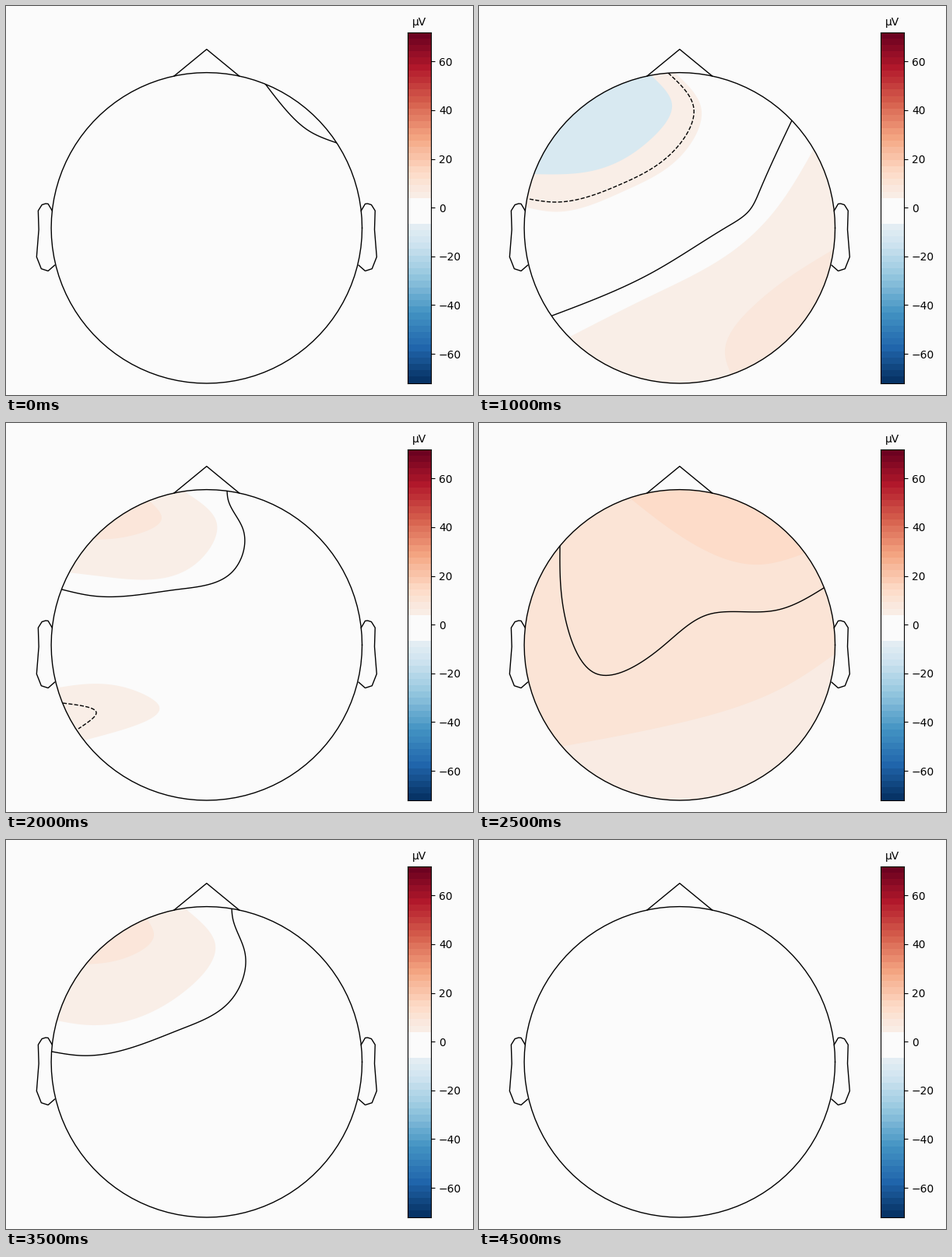
Animation of 600 by 500 pixels, one loop 5 s. Source, as a matplotlib script:

```python
import numpy as np
import matplotlib.pyplot as plt
from matplotlib.animation import ArtistAnimation
from matplotlib.patches import Circle, Polygon

W, H = 600, 500
CX, CY, R = 257.8, 285.3, 199.7
VMAX = 72
PAPER = "#fbfbfb"
CORNERS = {"tl": (0, 0), "tr": (520, 0), "br": (520, 500), "bl": (0, 500)}

fig = plt.figure(figsize=(W / 100, H / 100), dpi=100, facecolor=PAPER)
ax = fig.add_axes([0, 0, 1, 1])
ax.set(xlim=(0, W), ylim=(H, 0))
ax.axis("off")


def tint(volts):
    if -6.3 < volts < 4:
        return PAPER
    return plt.get_cmap("RdBu_r")(0.5 + volts / (2 * VMAX))


def curve(*pts, n=120):
    """Natural cubic spline through key points, sampled by chord length."""
    p = np.array(pts, float)
    h = np.hypot(*np.diff(p, axis=0).T)
    s = np.append(0, np.cumsum(h))
    d = np.diff(p, axis=0) / h[:, None]
    a = np.zeros((len(p), len(p)))
    b = np.zeros_like(p)
    a[0, :2], a[-1, -2:] = (2, 1), (1, 2)
    b[0], b[-1] = 3 * d[0], 3 * d[-1]
    for i in range(1, len(p) - 1):
        a[i, i - 1:i + 2] = h[i], 2 * (h[i - 1] + h[i]), h[i - 1]
        b[i] = 3 * (h[i] * d[i - 1] + h[i - 1] * d[i])
    m = np.linalg.solve(a, b)
    u = np.linspace(0, s[-1], n)
    k = np.clip(np.searchsorted(s, u) - 1, 0, len(h) - 1)
    t, w = ((u - s[k]) / h[k])[:, None], h[k][:, None]
    return (p[k] * (1 + 2 * t) * (1 - t)**2 + p[k + 1] * t**2 * (3 - 2 * t)
            + w * t * (1 - t) * (m[k] * (1 - t) - m[k + 1] * t))


def blend(a, b, t):
    return a + (b - a) * t


def clip(artist):
    artist.set_clip_path(Circle((CX, CY), R, transform=ax.transData))
    return artist


def disc(volts=0):
    return ax.add_patch(Circle((CX, CY), R, fc=tint(volts), lw=0, zorder=1))


def area(volts, edge, *corners):
    """Fill one side of a curve, closed through points outside the head."""
    ends = []
    for end in edge[[0, -1]]:
        v = end - (CX, CY)
        ends.append((CX, CY) + v * max(1, 1.06 * R / np.hypot(*v)))
    shape = np.vstack([ends[0], edge, ends[1]] + [CORNERS[c] for c in corners])
    return clip(ax.add_patch(Polygon(shape, fc=tint(volts), lw=0, zorder=2)))


def line(path, style="-"):
    return clip(ax.plot(*path.T, "k", ls=style, lw=1, zorder=3)[0])


def head():
    a = np.linspace(0, 2 * np.pi, 101)
    nose = np.exp(1j * np.arccos(np.radians(12)))
    ear_x = 2 * np.array([.497, .510, .518, .5299, .5419, .54, .547, .532, .510, .489])
    ear_y = 2 * np.array([.0555, .0775, .0783, .0746, .0555,
                          -.0055, -.0932, -.1313, -.1384, -.1199])
    parts = [(np.cos(a), np.sin(a)),
             ([-nose.real, 0, nose.real], [nose.imag, 1.15, nose.imag]),
             (ear_x, ear_y), (-ear_x, ear_y)]
    for x, y in parts:
        ax.plot(CX + R * np.array(x), CY - R * np.array(y), "k", lw=1, zorder=4)


def scale_bar(left=516.2, bottom=484.7, width=30, height=451, bands=55):
    bar = fig.add_axes([left / W, 1 - bottom / H, width / W, height / H])
    edges = np.linspace(-VMAX, VMAX, bands + 1)
    for lo, hi in zip(edges, edges[1:]):
        bar.axhspan(lo, hi, fc=tint((lo + hi) / 2), lw=0)
    bar.set(xlim=(0, 1), ylim=(-VMAX, VMAX), xticks=[], yticks=range(-60, 61, 20))
    bar.yaxis.tick_right()
    bar.set_title("µV", fontsize=10)


def start():
    return [disc(), line(curve((333, 100), (360, 134), (390, 161), (425, 176)))]


def warm_left():
    hot = curve((62, 238), (90, 245), (134, 218), (162, 145), (158, 112))
    warm = curve((94, 398), (175, 375), (221, 308), (225, 200), (209, 125), (184, 100))
    zero = curve((205, 93), (247, 128), (297, 210), (340, 283), (442, 360))
    cool = curve((228, 88), (283, 127), (338, 207), (405, 264), (457, 267))
    cold = curve((278, 88), (332, 140), (375, 192), (442, 209))
    pale = curve((196, 94), (254, 190), (282, 335), (267, 380), (326, 437), (250, 484))
    white = curve((200, 94), (262, 160), (312, 265), (369, 352), (430, 381))
    parts = [disc(9.5), area(5, pale, "br", "tr"), area(0, white, "br", "tr")]
    parts += [area(v, blend(cool, cold, t), "tr")
              for v, t in [(5, -.12), (-13, .2), (-17.4, 1.2), (-20.7, 1.4)]]
    parts += [area(v, blend(hot, warm, t), "tl")
              for v, t in [(14.4, .72), (17, .27), (19.5, .05)]]
    parts.append(area(22, curve((84, 188), (122, 164), (133, 126)), "tl"))
    parts += [line(c) for c in (hot, warm, zero)]
    tip = curve((366, 120), (380, 131), (398, 143))
    return parts + [line(c, "--") for c in (cool, cold, tip)]


def cold_left():
    ring = curve((243, 86), (276, 132), (255, 181), (180, 230), (95, 252), (64, 248))
    core = curve((222, 90), (248, 127), (222, 170), (145, 212), (68, 216))
    zero = curve((94, 398), (220, 344), (320, 283), (348, 262), (360, 239), (402, 147))
    pale = curve((115, 426), (220, 373), (330, 312), (376, 268), (430, 184))
    warm = curve((324, 474), (316, 447), (350, 388), (457, 312))
    return [disc(), area(5, blend(ring, core, -.35), "tl"), area(-11.5, core, "tl"),
            area(5, pale, "br", "bl"), area(8, warm, "br"),
            line(ring, "--"), line(zero)]


# The warm patch at the upper left: its edge, its core and the zero line around it.
SMALL = (curve((232, 90), (271, 130), (245, 180), (130, 198), (80, 192)),
         curve((182, 98), (200, 122), (160, 145), (115, 150)),
         curve((284, 87), (285, 97), (305, 138), (292, 190), (220, 214),
               (110, 222), (72, 214)))
LARGE = (curve((230, 88), (269, 135), (225, 198), (95, 237), (65, 232)),
         curve((180, 100), (190, 122), (160, 149), (100, 160)),
         curve((290, 88), (291, 99), (307, 145), (288, 207), (225, 243),
               (95, 277), (59, 272)))


def corner(patch):
    edge, core, zero = patch
    return [disc(), area(5, edge, "tl"), area(8.5, core, "tl"), line(zero)]


def fading():
    edge, _, zero = SMALL
    right = curve((457, 262), (405, 315), (425, 395))
    return [disc(), area(5, edge, "tl"), area(5, right, "br"), line(zero)]


def small_patch():
    pale = curve((62, 341), (160, 342), (195, 361), (100, 408))
    ring = curve((73, 360), (116, 373), (93, 393))
    return corner(SMALL) + [area(5, pale, "bl"), line(ring, "--")]


def all_warm():
    pale = curve((105, 416), (260, 385), (400, 335), (457, 297))
    warm = curve((192, 95), (260, 146), (360, 182), (425, 165))
    level = curve((104, 157), (113, 260), (150, 322), (230, 292), (295, 246),
                  (380, 241), (443, 212))
    return [disc(10), area(6, pale, "br", "bl"), area(14, warm, "tr", "tl"),
            line(level)]


def cooling():
    edge, _, zero = LARGE
    return [disc(5), area(8.5, edge, "tl"), line(zero)]


def pale_rise():
    edge = curve((72, 355), (300, 298), (446, 218))
    return [disc(5), area(0, edge, "br", "bl")]


head()
scale_bar()
scenes = [start(), warm_left(), cold_left(), fading(), small_patch(),
          all_warm(), cooling(), corner(LARGE), pale_rise(), [disc()]]
anim = ArtistAnimation(fig, scenes, interval=500, repeat=True, repeat_delay=0)
plt.show()
```
